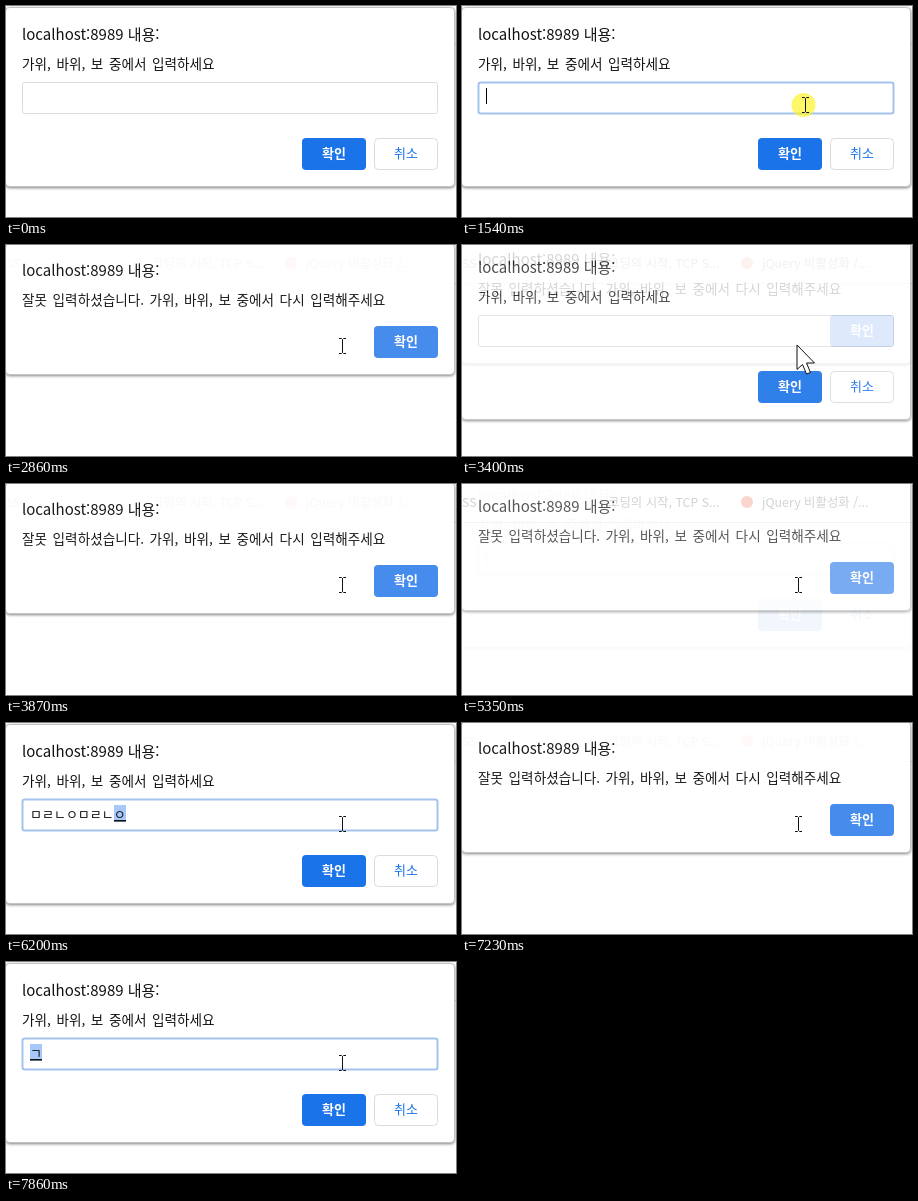
Animation of 450 by 211 pixels, one loop 8000 ms. Source, as an HTML page:

```html
<!DOCTYPE html>
<html lang="ko">
<head>
<meta charset="utf-8">
<title>가위 바위 보</title>
<style>
  html, body { margin: 0; width: 100%; height: 100%; overflow: hidden; background: #fff; }
  svg { display: block; width: 450px; height: 211px; font-family: "Noto Sans CJK KR", "Noto Sans CJK", "Noto Sans", sans-serif; }
  text { fill: #111; white-space: pre; }
  .title { font-size: 15px; }
  .message { font-size: 13.6px; word-spacing: 1.8px; }
  .bookmark { font-size: 12.4px; fill: #5f6368; }
  .entry { font-size: 13px; }
  .label { font-size: 13px; font-weight: 700; text-anchor: middle; fill: #fff; }
  .panel { fill: #fff; stroke: #c0c2c4; filter: drop-shadow(0 1.5px 1.5px rgba(0, 0, 0, .5)); }
  .primary { fill: #1a73e8; }
  .primary.active { fill: #3f88ec; }
  .plain { fill: #fff; stroke: #dadce0; }
  .cancel { font-weight: 400; fill: #1a73e8; }
  .focused { stroke: #a3c3ee; stroke-width: 2; }
</style>
</head>
<body>
<svg viewBox="0 0 450 211">
  <g id="page">
    <path d="M0 38.5H450" stroke="#dadce0"/>
    <text class="bookmark" x="0" y="23">SS</text>
    <text class="bookmark" x="146" y="23">코딩의 시작, TCP S...</text>
    <circle cx="285" cy="18" r="6" fill="#ee6a50"/>
    <text class="bookmark" x="300" y="23">jQuery 비활성화 /...</text>
  </g>
  <g id="prompt">
    <rect class="panel" x="-.5" y="1.5" width="449" height="179" rx="4"/>
    <text class="title" x="16" y="34">localhost:8989 내용:</text>
    <text class="message" x="16" y="63">가위, 바위, 보 중에서 입력하세요</text>
    <rect id="field" class="plain" x="16.5" y="76.5" width="415" height="31" rx="2"/>
    <rect id="mark" y="82" width="12" height="17" fill="#a8c8fa"/>
    <text id="entry" class="entry" x="24" y="96"></text>
    <rect id="underline" y="97" width="12" height="1.5" fill="#111"/>
    <rect id="caret" x="24" y="82" width="1" height="16" fill="#000"/>
    <rect class="primary" x="296" y="132" width="64" height="32" rx="4"/>
    <text class="label" x="328" y="152">확인</text>
    <rect class="plain" x="368.5" y="132.5" width="63" height="31" rx="4"/>
    <text class="label cancel" x="400" y="152">취소</text>
  </g>
  <g id="alert">
    <rect class="panel" x="-.5" y="1.5" width="449" height="131" rx="4"/>
    <text class="title" x="16" y="34">localhost:8989 내용:</text>
    <text class="message" x="16" y="63">잘못 입력하셨습니다. 가위, 바위, 보 중에서 다시 입력해주세요</text>
    <rect class="primary active" x="368" y="84" width="64" height="32" rx="4"/>
    <text class="label" x="400" y="104">확인</text>
  </g>
  <g id="pointer">
    <circle id="click" cx="-2" r="12" fill="#fff31a" fill-opacity=".65"/>
    <path id="arrow" d="M0 0V24.5L5.5 19.5L9.5 29L13.5 27.5L9.5 18H17.5Z" fill="#fff" stroke="#111"/>
    <path id="beam" d="M-3.5 -7.5H-1L0 -6.5L1 -7.5H3.5M0 -6.5V6.5M-3.5 7.5H-1L0 6.5L1 7.5H3.5" fill="none" stroke="#111"/>
  </g>
</svg>
<script>
const LOOP = 8000;
const el = id => document.getElementById(id);
const show = (id, on) => el(id).setAttribute('visibility', on ? 'inherit' : 'hidden');

const keys = [{
  at: 0, prompt: [1, 0], alert: [0, 0], text: '', focus: false, caret: false,
  cursor: null, x: 336.5, y: 101, click: false
}];
const key = (at, change) => keys.push({ ...keys[keys.length - 1], ...change, at });

// Pointer glides up into the field, clicks, then settles.
function enterField() {
  for (let i = 0; i < 11; i++) {
    const rise = 1 - (1 - Math.min(1, i / 6)) ** 2;
    const settle = Math.max(0, (i - 7) / 3);
    const y = 157 - 58 * rise + 2 * settle;
    key(1000 + i * 77, {
      x: 376.5 - 33 * rise - 7 * settle, y,
      cursor: y > 108 ? 'arrow' : 'beam',
      click: i > 5 && i < 9, focus: i > 5, caret: i > 5
    });
  }
}

// Each pose: outgoing opacity and offset, incoming opacity and offset.
function swap(start, end, from, to, poses, change) {
  const step = (end - start) / poses.length;
  poses.forEach(([a, ay, b, by], i) =>
    key(start + i * step, { [from]: [a, ay], [to]: [b, by], ...change }));
  key(end, { [from]: [0, 0], [to]: [1, 0] });
}

const openAlert = (start, end) => swap(start, end, 'prompt', 'alert',
  [[.9, -6, .17, -14], [.35, -12, .7, -4]],
  { focus: false, caret: false, cursor: 'arrow', x: 335, y: 100 });

function closeAlert(start, end) {
  const poses = end - start > 200
    ? [[.96, -3, 0, -20], [.5, -9, .2, -14], [.08, -16, .7, -4]]
    : [[.7, -6, .05, -17], [.1, -14, .6, -5]];
  swap(start, end, 'alert', 'prompt', poses,
    { text: '', focus: true, caret: true, cursor: 'beam', x: 336.5, y: 101 });
}

const type = (at, text) => key(at, { text, caret: false });

enterField();
key(2080, { caret: false });
openAlert(2240, 2400);
closeAlert(2860, 3090);
openAlert(3400, 3550);
closeAlert(3870, 4110);
type(4260, 'ㅁㄹㅇㄴ');
openAlert(4500, 4640);
closeAlert(5350, 5490);
type(5810, 'ㅁㄹㄴㅇ');
type(6200, 'ㅁㄹㄴㅇㅁㄹㄴㅇ');
openAlert(6520, 6680);
closeAlert(7230, 7460);
key(7780, { caret: false });
type(7860, 'ㄱ');

function place(id, [opacity, dy]) {
  el(id).setAttribute('opacity', opacity);
  el(id).setAttribute('transform', `translate(0 ${dy})`);
}

function render(state) {
  place('prompt', state.prompt);
  place('alert', state.alert);
  el('field').classList.toggle('focused', state.focus);
  el('entry').textContent = state.text;
  for (const id of ['mark', 'underline']) {
    el(id).setAttribute('x', 12 + 12 * state.text.length);
    show(id, state.text);
  }
  show('caret', state.caret);
  el('pointer').setAttribute('transform', `translate(${state.x} ${state.y})`);
  show('arrow', state.cursor === 'arrow');
  show('beam', state.cursor === 'beam');
  show('click', state.click);
}

let current;
function tick() {
  const t = performance.now() % LOOP;
  const state = keys.findLast(k => k.at <= t);
  if (state !== current) render(current = state);
  requestAnimationFrame(tick);
}
tick();
</script>
</body>
</html>
```
